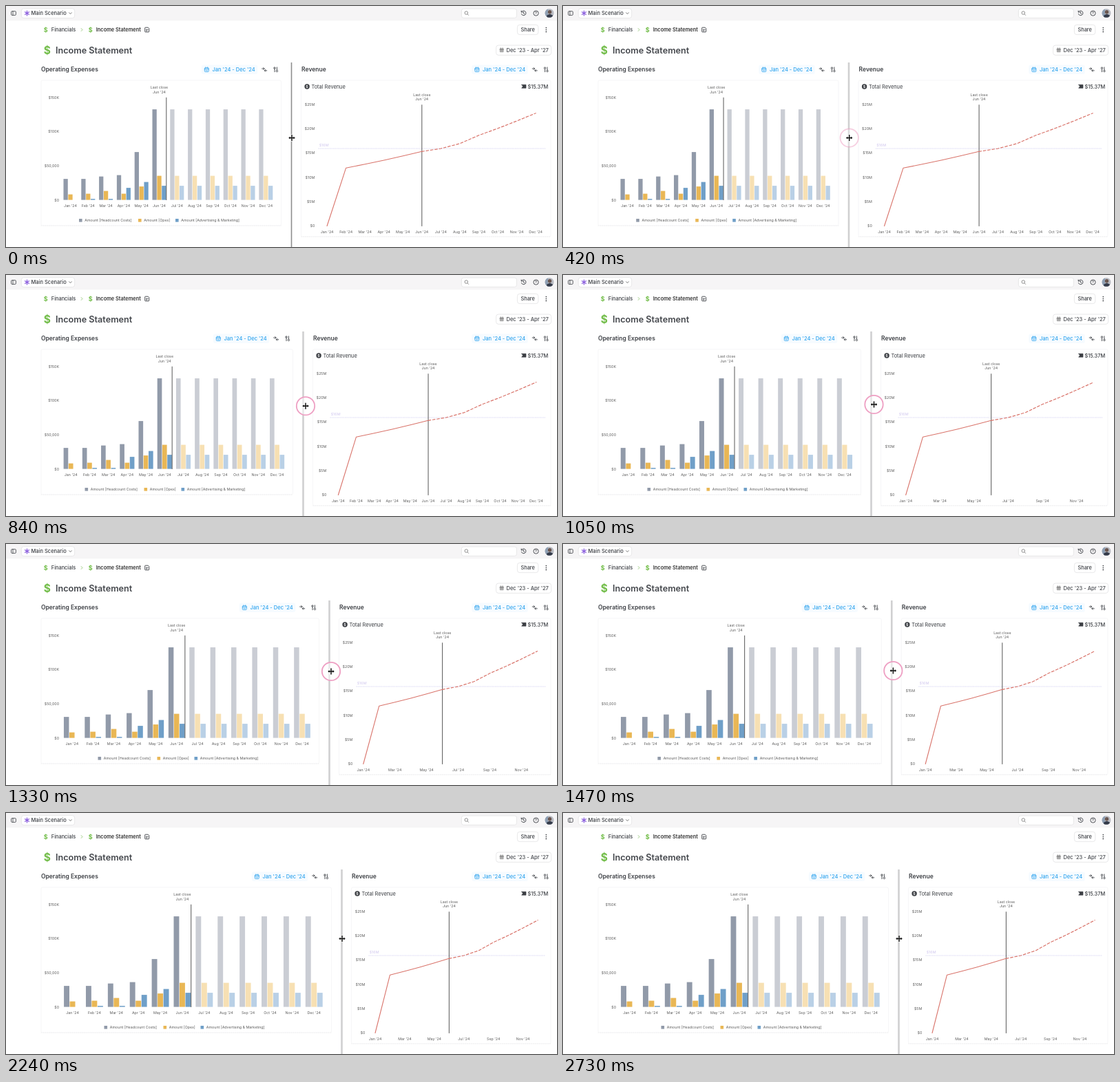
An HTML page for the animation above (3010 ms loop, 800 px wide and 350 px high).

```html
<!DOCTYPE html>
<html lang="en">
<head>
<meta charset="utf-8">
<title>Income Statement</title>
<style>
html, body { margin: 0; width: 100%; height: 100%; overflow: hidden; background: #fff; }
svg { display: block; width: 800px; height: 350px; }
text { font-family: Inter, "Open Sans", Arial, sans-serif; white-space: pre; }
</style>
</head>
<body>
<svg viewBox="0 0 800 350" xmlns="http://www.w3.org/2000/svg">
  <g id="page"></g>
  <g id="split"></g>
</svg>
<script>
const LOOP = 3010, STEP = 70;
const MONTHS = "Jan Feb Mar Apr May Jun Jul Aug Sep Oct Nov Dec".split(" ").map(m => m + " '24");
const INK = "#3c3f44", AXIS = "#5c5c5c", BLUE = "#2da3ee", GREEN = "#72bd49";

// [time, position] pairs
const DIVIDER = [[350, 414.5], [630, 420], [840, 431.5], [1050, 447.5], [1330, 469.5], [1500, 478.5], [1680, 484], [1960, 487.1], [2170, 487.5]];
const POINTER_X = [[350, 415], [630, 422.5], [840, 435], [1050, 451.5], [1330, 472], [1500, 480.5], [1680, 485.5], [1960, 487.7], [2170, 488]];
const POINTER_Y = [[630, 191.5], [1050, 188], [1330, 185], [1680, 183], [2100, 182.5]];

// bar heights in pixels: [headcount, opex, marketing]
const BARS = [[30.5, 8, 0], [30.5, 9, 1.5], [34, 13, 1.5], [36, 9, 17.5], [69.5, 19.5, 26]];
const JUNE = [131.5, 35, 20.5];
const SERIES = [
  ["#919aa9", "#cacdd4", "Amount [Headcount Costs]", 0],
  ["#e9b755", "#f7e0b3", "Amount [Opex]", 86],
  ["#6f9fc8", "#b9d0e6", "Amount [Advertising & Marketing]", 140]
];
const REVENUE = [319.5, 235.2, 229.8, 224, 217.8, 211.3, 207, 199.8, 187.8, 177.8, 167, 155.7];

// monotone cubic through the keys
function sample(keys, t) {
  const n = keys.length - 1;
  if (t <= keys[0][0]) return keys[0][1];
  if (t >= keys[n][0]) return keys[n][1];
  const slope = i => (keys[i + 1][1] - keys[i][1]) / (keys[i + 1][0] - keys[i][0]);
  const tangent = i => {
    if (i === 0 || i === n) return 0;
    const a = slope(i - 1), b = slope(i);
    return a * b > 0 ? 2 * a * b / (a + b) : 0;
  };
  let i = 0;
  while (t >= keys[i + 1][0]) i++;
  const h = keys[i + 1][0] - keys[i][0], u = (t - keys[i][0]) / h, v = 1 - u;
  return v * v * (1 + 2 * u) * keys[i][1] + u * u * (3 - 2 * u) * keys[i + 1][1]
    + h * u * v * (v * tangent(i) - u * tangent(i + 1));
}

const clamp = v => Math.max(0, Math.min(1, v));
const esc = s => s.replace(/&/g, "&amp;");

function text(x, y, s, size = 5.3, fill = AXIS, weight = 400, anchor = "start") {
  return `<text x="${x}" y="${y + size * 0.364}" font-size="${size}" fill="${fill}" font-weight="${weight}" text-anchor="${anchor}">${esc(s)}</text>`;
}
const mid = (x, y, s) => text(x, y, s, 5.3, AXIS, 400, "middle");
const end = (x, y, s) => text(x, y, s, 5.3, AXIS, 400, "end");
const rect = (x, y, w, h, fill, more = "") => `<rect x="${x}" y="${y}" width="${w}" height="${h}" fill="${fill}" ${more}/>`;
const box = (x, y, w, h, r = 3.5) => rect(x, y, w, h, "#fff", `rx="${r}" stroke="#e2e2e4" stroke-width=".8"`);
const path = (d, color = INK, w = 0.9, more = "") =>
  `<path d="${d}" fill="none" stroke="${color}" stroke-width="${w}" stroke-linecap="round" stroke-linejoin="round" ${more}/>`;
const disc = (x, y, r, fill) => `<circle cx="${x}" cy="${y}" r="${r}" fill="${fill}"/>`;
const at = (x, y, s) => `<g transform="translate(${x} ${y})">${s}</g>`;

const calendar = (x, y, c) => at(x, y,
  rect(-3, -2.6, 6, 5.8, "none", `rx="1" stroke="${c}" stroke-width=".8"`) +
  path("M-3 -.7H3M-1.4 -3.5V-2M1.4 -3.5V-2M-1.5 1.3H1.5", c, 0.8));

const compare = (x, y) => at(x, y,
  path("M-3.4 -1.3H0M-1.4 -2.7L0 -1.3L-1.4 .1M3.6 1.5H.2M1.6 .1L.2 1.5L1.6 2.9", INK, 0.9));

const sliders = (x, y) => at(x, y,
  path("M-1.7 -1V3.4M1.7 -3.4V1", INK, 0.9) +
  [[-1.7, -2.2], [1.7, 2.2]].map(([a, b]) =>
    `<circle cx="${a}" cy="${b}" r="1.2" fill="#fff" stroke="${INK}" stroke-width=".9"/>`).join(""));

// date range and icons; x is the right edge of the date text
function tools(x) {
  return rect(x - 77.5, 85.5, 81.5, 13.5, "#f6fbff", 'rx="3"') + calendar(x - 70, 92.3, BLUE) +
    text(x - 61.8, 92.3, "Jan '24 - Dec '24", 7.5, BLUE, 500) +
    compare(x + 13.8, 92.3) + sliders(x + 30.4, 92.3);
}

function lastClose(x, y, lineX, bottom) {
  return mid(x, y, "Last close") + mid(x, y + 6.6, "Jun '24") +
    path(`M${lineX} ${y + 15}V${bottom}`, "#565656", 1);
}

const card = (x, w, h) =>
  rect(x, 108, w, h, "none", 'stroke="#f3f3f4" stroke-width=".7" rx="2"') +
  path(`M${x} ${108 + h}h${w}`, "#e9e9ea", 0.7, 'stroke-dasharray="1 2"');

function page() {
  const arms = [0, 60, 120].map(a => `<path d="M0 -3.4V3.4" stroke="#8658dc" stroke-width="1.3" stroke-linecap="round" transform="rotate(${a})"/>`).join("");
  return rect(0, 0, 800, 21.3, "#f6f5f6") +
    rect(7.6, 7.6, 6.8, 5.8, "none", `rx="1.2" stroke="${INK}" stroke-width=".8"`) + path("M10 7.6V13.4", INK, 0.8) +
    box(22.3, 3.6, 77.4, 14) + at(30.5, 10.5, arms) +
    text(36.5, 10.5, "Main Scenario", 7.5, INK, 500) + path("M91.6 9.7L93.4 11.5L95.2 9.7", "#666", 0.9) +
    box(661.4, 4, 80, 13.4, 3) +
    `<circle cx="668.3" cy="10" r="2.3" fill="none" stroke="#777" stroke-width=".8"/>` + path("M670 11.8L671.6 13.4", "#777", 0.8) +
    path("M748.5 8.7A3.4 3.4 0 1 1 748.3 11.5M748.2 7V9H750.2M751.6 8.7V10.8L753 11.6") +
    `<circle cx="769.5" cy="10.5" r="3.6" fill="none" stroke="${INK}" stroke-width=".9"/>` +
    text(769.5, 10.5, "?", 5.3, INK, 600, "middle") +
    `<clipPath id="face"><circle cx="789" cy="10.4" r="6.4"/></clipPath><g clip-path="url(#face)">` +
    rect(782, 3, 14, 15, "#b9bcc4") + rect(782, 3, 5, 15, "#8fa0b4") +
    disc(789.5, 8.7, 2.7, "#6b5750") + `<ellipse cx="789.5" cy="17" rx="5" ry="5.2" fill="#343b4a"/></g>` +
    text(57.6, 34.5, "$", 9, GREEN, 700, "middle") + text(65.8, 34.5, "Financials", 7.4, INK, 500) +
    path("M109.2 32.6L111 34.5L109.2 36.4", "#92c474", 0.9) +
    text(122.8, 34.5, "$", 9, GREEN, 700, "middle") + text(130.8, 34.5, "Income Statement", 7.4, "#333", 600) +
    path("M206 31.2H202.4Q201.7 31.2 201.7 32V37Q201.7 37.8 202.5 37.8H207Q207.7 37.8 207.7 37V33ZM203.4 34.3H206M203.4 36H205", INK, 0.9) +
    box(742.4, 27.3, 30.4, 14.3) + text(757.7, 34.5, "Share", 7.4, INK, 500, "middle") +
    [31.6, 34.5, 37.4].map(y => disc(784.3, y, 0.85, INK)).join("") +
    text(59.8, 64.2, "$", 15.5, GREEN, 700, "middle") + text(72, 64.5, "Income Statement", 12.65, "#45484d", 600) +
    box(711.6, 57, 80, 14.4) + rect(716.8, 61.4, 5.8, 5.8, "#aaa", 'rx="1"') + path("M717 63H722.4M718.3 60.8V62M721.1 60.8V62", "#777", 0.8) +
    text(726.5, 64.3, "Dec '23 - Apr '27", 7.5, "#45484d", 500) +
    text(51, 91.6, "Operating Expenses", 8.5, INK, 600) + tools(753.8) +
    path("M748.7 114.3H755V119.3H748.7L750.4 116.8Z", INK, 0.6, `style="fill:${INK}"`) +
    text(787.2, 117, "$15.37M", 7.4, INK, 500, "end");
}

function expenses(d) {
  const left = 80.6, base = 281.6, pitch = (d - 24.3 - left) / 12;
  const slot = pitch * 0.8 / 3, gap = 0.6;
  let s = card(51, d - 66, 211);
  ["$0", "$50,000", "$100K", "$150K"].forEach((l, i) => s += end(77, base - i * 49.6, l));
  MONTHS.forEach((m, i) => {
    const cx = left + (i + 0.5) * pitch;
    s += mid(cx, 289.7, m);
    (BARS[i] || JUNE).forEach((h, k) => {
      if (h) s += rect(cx + (k - 1.5) * slot + gap / 2, base - h, slot - gap, h, SERIES[k][i > 5 ? 1 : 0]);
    });
  });
  s += lastClose(left + 5.5 * pitch, 118.2, left + 5.9 * pitch, base);
  const lx = 106 + (d - 414.5) / 2;
  SERIES.forEach(([color, , name, dx]) => s += rect(lx + dx, 309, 4.6, 4.6, color) + text(lx + dx + 8.3, 311.4, name));
  return s;
}

function revenue(d) {
  const left = d + 37.8, right = 782.9, pitch = (right - left) / 12;
  const px = i => left + (i + 0.5) * pitch;
  const line = (a, b) => "M" + REVENUE.slice(a, b).map((y, i) => `${px(a + i)} ${y}`).join("L");
  const every = pitch < 26 ? 2 : 1;
  let s = card(d + 14, 777 - d, 227) + text(d + 14.6, 91.6, "Revenue", 8.5, INK, 600) +
    disc(d + 22.6, 117, 3.7, INK) + text(d + 22.6, 117, "$", 5.3, "#fff", 600, "middle") +
    text(d + 29, 117, "Total Revenue", 7.4, INK, 400);
  for (let i = 0; i < 6; i++) s += end(d + 33.8, 319.3 - i * 35.25, i ? `$${i * 5}M` : "$0");
  MONTHS.forEach((m, i) => { if (i % every === 0) s += mid(px(i), 328, m); });
  s += path(`M${left + 1.5} 207H${right}`, "#d9d6f3", 0.9, 'stroke-dasharray=".8 1.6"') +
    text(left + 2.4, 202, "$16M", 5.3, "#d6cef0", 500) +
    lastClose(px(5), 128.7, px(5), 319.5) +
    path(line(0, 6), "#d9746b", 1.1) +
    path(line(5, 12), "#d9746b", 1.2, 'stroke-dasharray="3.6 2.8"');
  return s;
}

function pointer(x, y, ring) {
  const bars = "M0 -4V4M-3.5 0H3.5", tips = "M-4.6 0L-2.5 -1.9V1.9ZM4.6 0L2.5 -1.9V1.9Z";
  return at(x, y,
    `<circle r="13.2" fill="#fff" fill-opacity=".5" stroke="#ee9fc3" stroke-width="1.8" opacity="${ring}"/>` +
    path(bars, "#fff", 3.2) + path(tips, "#fff", 1.6) +
    path(bars, "#111", 1.5) + `<path d="${tips}" fill="#111"/>`);
}

function split(t) {
  const d = sample(DIVIDER, t);
  const ring = Math.min(clamp((t - 350) / 140), clamp((2170 - t) / 140));
  const bar = t < 350 ? rect(d - 0.8, 82, 1.6, 268, "#8e8e8e") : rect(d - 1.3, 82, 2.6, 268, "#d0d0d1");
  return expenses(d) + tools(d - 53.2) + revenue(d) + bar +
    pointer(sample(POINTER_X, t), sample(POINTER_Y, t), ring);
}

const layer = document.getElementById("split");
document.getElementById("page").innerHTML = page();
const start = performance.now();
let shown = -1;

function tick() {
  const step = Math.floor((performance.now() - start) % LOOP / STEP);
  if (step !== shown) {
    shown = step;
    layer.innerHTML = split(step * STEP);
  }
  requestAnimationFrame(tick);
}
tick();
</script>
</body>
</html>
```
